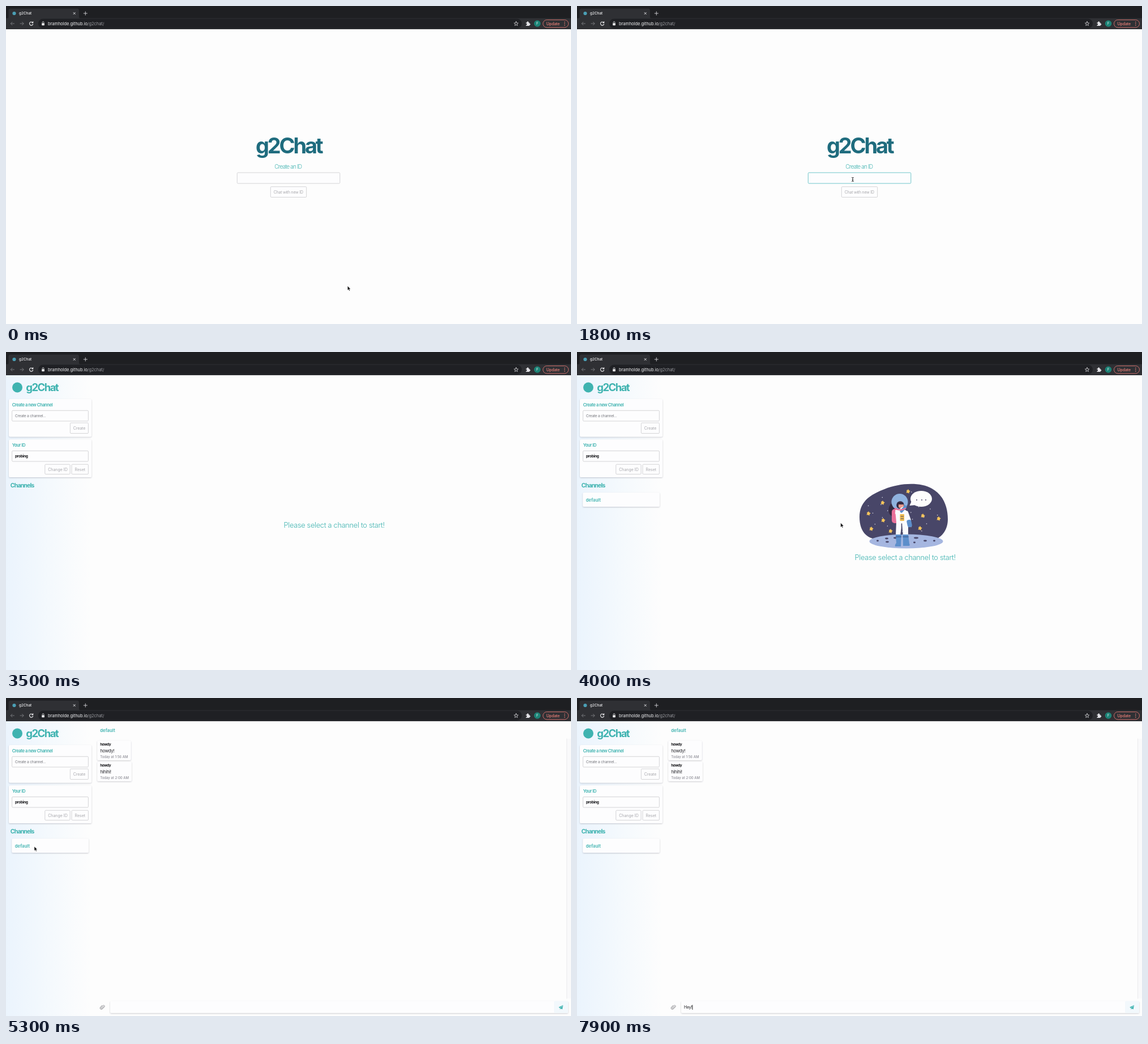
Animation, 998 px wide and 561 px high, one loop 8000 ms. Source, as an HTML page:

```html
<!DOCTYPE html>
<html lang="en">
<head>
<meta charset="utf-8">
<title>g2Chat</title>
<style>
html, body { margin: 0; width: 100%; height: 100%; overflow: hidden; background: #fdfdfd; }
svg { display: block; width: 100vw; height: 100vh; }
text { font-family: Inter, Roboto, sans-serif; font-optical-sizing: none; white-space: pre; }
</style>
</head>
<body>
<svg id="stage" viewBox="0 0 998 561" preserveAspectRatio="none">
  <defs>
    <linearGradient id="side">
      <stop offset="0" stop-color="#ebf4fd"/>
      <stop offset=".5" stop-color="#f4f9fd"/>
      <stop offset="1" stop-color="#fdfdfd"/>
    </linearGradient>
    <filter id="shadow" x="-10%" y="-20%" width="120%" height="150%">
      <feDropShadow dx="0" dy="1" stdDeviation="1.1" flood-color="#334" flood-opacity=".26"/>
    </filter>
    <path id="star" d="M0-4.2Q.9-1.2 3.8-.6Q1.2.6 1.6 3.8Q-.4 1.6-3.6 2.4Q-1.6 0-3-2.6Q-.8-1.6 0-4.2Z" fill="#f5c55c"/>
  </defs>
</svg>
<script>
const LOOP = 8000, STEP = 100;
const TEAL = '#3fb3b0', GREY = '#a8a8ac', INK = '#151518';
const NAME = 'probing', REPLY = 'Hey!';
const stage = document.getElementById('stage');

const text = (x, y, str, size, fill, weight = 400, spacing = 0, id = '') =>
  `<text id="${id}" x="${x}" y="${y}" font-size="${size}" fill="${fill}" font-weight="${weight}" letter-spacing="${spacing}">${str}</text>`;
const box = (x, y, w, h, fill, stroke = 'none', r = 1.5, extra = '') =>
  `<rect x="${x}" y="${y}" width="${w}" height="${h}" rx="${r}" fill="${fill}" stroke="${stroke}" ${extra}/>`;
const card = (x, y, w, h) => box(x, y, w, h, '#fdfdfe', 'none', 2.5, 'filter="url(#shadow)"');
const field = (x, y, w, h, stroke = '#d0d0d2', id = '') =>
  box(x, y, w, h, '#fdfdfe', stroke, 1.5, `stroke-width=".9" id="${id}"`);
const circle = (x, y, r, fill) => `<circle cx="${x}" cy="${y}" r="${r}" fill="${fill}"/>`;
const ellipse = (x, y, rx, ry, fill) => `<ellipse cx="${x}" cy="${y}" rx="${rx}" ry="${ry}" fill="${fill}"/>`;
const path = (d, fill = 'none', stroke = 'none', width = 1) =>
  `<path d="${d}" fill="${fill}" stroke="${stroke}" stroke-width="${width}" stroke-linecap="round" stroke-linejoin="round"/>`;
const group = (id, ...parts) => `<g id="${id}">${parts.join('')}</g>`;

const browser = () => group('browser',
  box(0, 0, 998, 41, '#1e1f22', 'none', 0),
  box(0, 21.5, 998, 19.5, '#2f3034', 'none', 0),
  path('M2 22Q4.5 22 4.5 19V8Q4.5 4.5 8 4.5H125.500Q129 4.500 129 8V19Q129 22 131.500 22Z', '#2f3034'),
  circle(14.5, 13, 3.1, '#4a9fb5'),
  text(23, 15.3, 'g2Chat', 6.4, '#f1f1f3', 500),
  path('M119 11.300L122.400 14.700M122.400 11.300L119 14.700', 'none', '#e8e8ea', .9),
  path('M137.200 13H143.400M140.300 9.900V16.100', 'none', '#d4d4d8', .9),
  path('M14.500 31H8.500M11 28.300L8.300 31L11 33.700M25 31H31M28.500 28.300L31.200 31L28.500 33.700', 'none', '#77787c'),
  path('M47.200 29.300A3.100 3.100 0 1 0 47.600 32M47.700 27.600V29.800H45.500', 'none', '#f0f0f2', 1.1),
  box(57, 22.6, 854, 17, '#1f2024', 'none', 8.5),
  box(63.2, 30.2, 4.7, 4, '#ececee', 'none', .6),
  path('M64.200 30V28.800A1.350 1.350 0 0 1 66.900 28.800V30', 'none', '#ececee', .8),
  text(74, 33.8, 'bramholde.github.io<tspan fill="#9c9da2">/g2chat/</tspan>', 7.4, '#f2f2f4'),
  path('M901.100 27.300L902.100 29.900L904.800 30.100L902.700 31.800L903.400 34.500L901.100 33L898.800 34.500L899.500 31.800L897.400 30.100L900.100 29.900Z', 'none', '#d8d8dc', .8),
  path('M918.500 29.200H920.300A1.400 1.400 0 1 1 922.900 29.200H924.600V31A1.300 1.300 0 1 1 924.600 33.500V35H918.500V33.400A1.300 1.300 0 1 0 918.500 30.900Z', '#e4e4e8'),
  circle(938.500, 31, 5.800, '#1c8376'),
  text(936.8, 33.3, 'F', 6.2, '#e7f3f1'),
  box(948.5, 24.5, 45, 13.4, 'none', '#cf6f6b', 6.7),
  text(954.5, 33.6, 'Update', 7, '#ef8079', 500, -.15),
  [28.2, 31.1, 34].map(y => circle(986.7, y, .8, '#ef8079')).join(''));

const welcome = () => group('welcome',
  text(441, 260, 'g2Chat', 38, '#1f6c7e', 700, -3.2),
  text(474.3, 286.7, 'Create an ID', 10.1, TEAL, 300, -.85),
  field(408.3, 294, 181.5, 19, '#d0d0d2', 'idField'),
  text(414, 306, '', 6.7, INK, 700, 0, 'idText'),
  `<rect id="idCaret" y="299.500" width=".8" height="8.500" fill="#222"/>`,
  field(467.3, 318.8, 63.4, 18.6, '#d0d0d2', 'goBox'),
  text(472.8, 330.6, 'Chat with new ID', 6.9, GREY, 400, -.2, 'goText'));

const sidebar = () => group('sidebar',
  box(0, 41, 150, 520, 'url(#side)', 'none', 0),
  circle(20, 62.5, 9, TEAL),
  text(35.3, 69.3, 'g2Chat', 18.5, TEAL, 700, -1.55),
  card(5, 83, 146, 66.5),
  text(10.7, 96, 'Create a new Channel', 7.7, TEAL, 600, -.5),
  field(10.6, 103.2, 134.800, 18.700),
  text(16, 115, 'Create a channel...', 6.6, '#77787d', 400, -.22),
  field(113.4, 125, 32, 18.600),
  text(118.8, 136.8, 'Create', 7, GREY, 400, -.1),
  card(5, 154.3, 146, 66.700),
  text(10.7, 167.2, 'Your ID', 7.7, TEAL, 600, -.5),
  field(10.6, 174.4, 134.800, 18.600),
  text(16, 186.1, NAME, 6.6, INK, 700, -.35),
  field(68.8, 198.2, 44.300, 17.400),
  text(74.2, 209.5, 'Change ID', 7, GREY),
  field(116, 198.2, 29.400, 17.400),
  text(121.6, 209.5, 'Reset', 7, GREY),
  text(7.8, 238.5, 'Channels', 10.5, TEAL, 700, -.85),
  group('channel', card(10.3, 248, 135.700, 25), text(15.8, 263.8, 'default', 7.7, TEAL, 600)));

const starSpots = [[585, 246], [540, 266], [515, 285], [541, 297], [520, 312], [554, 316], [611, 289], [606, 311], [639, 294]];

function dots() {
  let out = '';
  for (let i = 0; i < 26; i++) {
    const angle = i * 2.4, r = Math.sqrt((i + 1) / 28);
    out += circle(577 + 68 * r * Math.cos(angle), 283 + 40 * r * Math.sin(angle), .75, '#e9e9f4');
  }
  return out;
}

const picture = () => group('picture',
  path('M499 291C499 264 517 252 543 242C570 231 606 229 627 241C647 252 655 273 655 295C655 313 646 326 630 332L522 329C506 324 499 310 499 291Z', '#484668'),
  dots(),
  starSpots.map(([x, y]) => `<use href="#star" x="${x}" y="${y}"/>`).join(''),
  ellipse(581.500, 334, 65, 12.500, '#a5b6e0'),
  [[531, 333], [548, 335], [563, 328], [596, 336], [615, 333], [599, 328], [631, 333], [547, 329]]
    .map(([x, y], i) => ellipse(x, y, 2 + i % 3, 1.4, '#484668')).join(''),
  path('M554 268Q548 277 552 286Q557 292 563 288L566 268Z', '#352b43'),
  box(556, 277, 14, 25, '#e9719b', 'none', 5),
  circle(570, 264.500, 14.500, '#8fb2df'),
  circle(571, 270, 6.800, '#352b43'),
  path('M568 269H577V274Q573 277 568 274Z', '#e99a8d'),
  path('M562 279Q572 275 581 279L585 301V323H576L574 305L571 323H563L564 300Z', '#fbfbfd'),
  path('M565 284L576 276', 'none', '#fbfbfd', 6),
  path('M573 281L580 273', 'none', '#5d8fcb', 5),
  path('M582 283L587 297', 'none', '#fbfbfd', 6),
  box(583, 296, 8, 13, '#5d8fcb', 'none', 3, 'transform="rotate(-12 587 302)"'),
  path('M562 276Q571 281 580 276', 'none', '#e9719b', 2.500),
  box(570.500, 286, 7.500, 12, '#efbc50', 'none', 1),
  path('M572 290H576.500M572 294H576.500', 'none', '#484668', 1),
  path('M573.500 303V322', 'none', '#484668', 1.600),
  path('M563 322H573L572 343H562Q561 340 564 337Z', '#5d8fcb'),
  path('M575.500 322H585L587 338Q589 342 586 342H576Z', '#5d8fcb'),
  path('M563.500 326H572.500M576 326H585', 'none', '#3d5e93', 1.500),
  ellipse(608, 259, 19, 14, '#fdfdfd'),
  path('M591 263L587.500 271L598 270Z', '#fdfdfd'),
  [600, 609, 616].map(x => circle(x, 261, 1, '#484668')).join(''));

const lobby = () => group('lobby', picture(),
  text(490.5, 310.2, 'Please select a channel to start!', 12.8, TEAL, 300, -.3, 'prompt'));

const message = (y, w, body, time) => card(161.3, y, w, 34.500) +
  text(166.2, y + 9, 'howdy', 6.4, INK, 700, -.45) +
  text(166.2, y + 20.7, body, 7.9, '#2b2b30', 400, -.35) +
  text(166.2, y + 31, `Today at ${time} AM`, 6, '#8d8d95', 500);

const chat = () => group('chat',
  text(166.2, 60.2, 'default', 7.8, TEAL, 600),
  group('messages', message(75.2, 59.300, 'howdy!', '1:56'), message(112.2, 60.500, 'hihihi!', '2:00')),
  box(990, 72, 8, 458, '#f9f9fa', 'none', 0),
  path('M990.500 72V530', 'none', '#e8e8ea', .8),
  card(184, 534.700, 809, 21),
  box(968, 534.700, 25, 21, '#f2f8fc', 'none', 2),
  path('M976.200 545.500L984 541.800L982.700 549.200L980 547.900L978.700 549.500L978.500 547.200Z', TEAL),
  path('M978.500 547.200L982.800 543.200', 'none', '#f2f8fc', .6),
  path('M172.400 544.300L169.700 547.400A1 1 0 0 1 168.200 546L171.300 542.700A1.600 1.600 0 0 1 173.700 545L170.200 548.600A2.300 2.300 0 0 1 166.800 545.400L169.600 542.400', 'none', '#77777c', .8),
  text(189, 548, '', 6.9, INK, 400, -.1, 'replyText'),
  `<rect id="replyCaret" y="541.500" width=".9" height="8.500" fill="#222"/>`);

const pointers = () =>
  group('arrow', path('M0 0V7.600L1.800 6L3 8.700L4.300 8.100L3.100 5.500H5.400Z', '#0b0b0d', '#fff', .5)) +
  group('beam', path('M-1.500-3.500Q0-3.500 0-2.500Q0-3.500 1.500-3.500M0-2.500V2.500M-1.500 3.500Q0 3.500 0 2.500Q0 3.500 1.500 3.500M-.8.8H.8', 'none', '#1a1a1c', .9));

stage.insertAdjacentHTML('beforeend',
  welcome() + sidebar() + lobby() + chat() + browser() + pointers());

const el = {};
stage.querySelectorAll('[id]').forEach(node => { if (node.id) el[node.id] = node; });
const show = (id, on) => el[id].setAttribute('display', on ? 'inline' : 'none');

// time, x, y
const route = [
  [100, 603.3, 494], [500, 487, 306], [3900, 487, 306], [4600, 102, 226.5],
  [5000, 50, 262], [5500, 50, 262], [6000, 293, 551]
];

function pointerAt(t) {
  const next = route.findIndex(key => key[0] > t);
  if (next === 0) return route[0].slice(1);
  if (next < 0) return route[route.length - 1].slice(1);
  const [t0, x0, y0] = route[next - 1], [t1, x1, y1] = route[next];
  const u = (t - t0) / (t1 - t0), k = u * u * (3 - 2 * u);
  return [x0 + (x1 - x0) * k, y0 + (y1 - y0) * k];
}

const typed = (str, t, start, gap) => str.slice(0, Math.max(0, Math.floor((t - start) / gap) + 1));
const blink = (t, start) => t >= start && (t - start) % 1000 < 500;

function setInput(textId, caretId, value, x, caretOn) {
  el[textId].textContent = value;
  const width = value ? el[textId].getComputedTextLength() : 0;
  el[caretId].setAttribute('x', x + width);
  show(caretId, caretOn);
}

function draw(t) {
  const joined = t >= 3400, loaded = t >= 3700, opened = t >= 5100;
  show('welcome', !joined);
  show('sidebar', joined);
  show('channel', loaded);
  show('lobby', joined && !opened);
  show('picture', loaded);
  el.prompt.setAttribute('y', loaded ? 366.7 : 310.2);
  show('chat', opened);
  show('messages', t >= 5300);

  const name = typed(NAME, t, 2500, 110), ready = name.length > 3;
  el.idField.setAttribute('stroke', t >= 500 ? '#5fbfc4' : '#d0d0d2');
  el.goBox.setAttribute('stroke', ready ? TEAL : '#d0d0d2');
  el.goText.setAttribute('fill', ready ? TEAL : GREY);
  setInput('idText', 'idCaret', name, 414, name ? true : blink(t, 900));

  const reply = typed(REPLY, t, 7100, 200);
  setInput('replyText', 'replyCaret', reply, 189, reply ? true : blink(t, 6200));

  const [x, y] = pointerAt(t);
  const visible = t < 2500 || (t >= 3900 && t < 7100);
  const overField = !joined ? y > 294 && y < 313 : opened && y > 535;
  show('arrow', visible && !overField);
  show('beam', visible && overField);
  for (const id of ['arrow', 'beam']) el[id].setAttribute('transform', `translate(${x} ${y})`);
}

const begin = performance.now();
function tick() {
  const t = (performance.now() - begin) % LOOP;
  draw(Math.floor(t / STEP) * STEP);
  requestAnimationFrame(tick);
}
tick();
</script>
</body>
</html>
```
